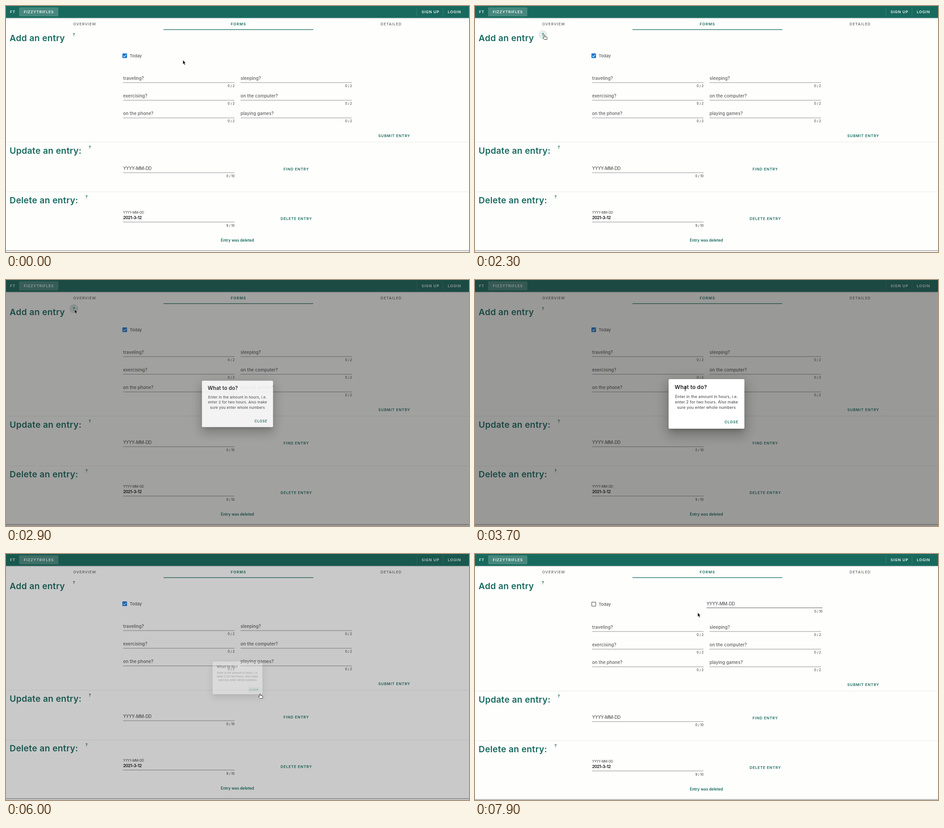
These frames come from a looping animation (1026 by 546 pixels, 8000 ms). An HTML page:

```html
<!DOCTYPE html>
<html lang="en">
<head>
<meta charset="utf-8">
<title>Entry forms</title>
<style>
  html, body { margin: 0; width: 100%; height: 100%; overflow: hidden; background: #fefefd; }
  svg { position: absolute; left: 0; top: 0; font-family: Inter, "Open Sans", sans-serif; font-weight: 600; }
  text { white-space: pre; }
  .head { font-size: 19.2px; letter-spacing: .3px; fill: #186a5e; }
  .label { font-size: 9.7px; font-weight: 500; letter-spacing: .1px; fill: #5e5e5e; }
  .today { font-size: 9.3px; font-weight: 500; fill: #5e5e5e; }
  .date { font-size: 9.7px; font-weight: 500; letter-spacing: -.4px; fill: #5e5e5e; }
  .mini { font-size: 7.2px; font-weight: 500; letter-spacing: -.35px; fill: #5e5e5e; }
  .value { font-size: 9.3px; letter-spacing: -.55px; fill: #111; }
  .count { font-size: 7px; font-weight: 500; text-anchor: end; fill: #4c4c4c; }
  .btn { font-size: 8.2px; letter-spacing: .78px; fill: #186a5e; }
  .bar { font-size: 8.2px; letter-spacing: .85px; fill: #f2f7f6; }
  .tab { font-size: 8.2px; font-weight: 500; letter-spacing: 1px; fill: #606060; }
  .tab.on { font-weight: 600; fill: #186a5e; }
  .help { font-size: 8.6px; font-weight: 700; text-anchor: middle; fill: #186a5e; }
  .note { font-size: 8.5px; fill: #186a5e; }
  .title { font-size: 12px; letter-spacing: .2px; fill: #1c1c1c; }
  .body { font-size: 8.6px; font-weight: 500; letter-spacing: .19px; text-anchor: middle; fill: #555; }
  .line { stroke: #8e8e8e; }
  .rule { stroke: #e9e9e9; }
  #dialog {
    left: 429px; top: 219.5px; background: #fff; border-radius: 2.5px;
    box-shadow: 0 7px 9px -4px #0003, 0 15px 23px 2px #00000024, 0 6px 28px 5px #0000001f;
  }
</style>
</head>
<body>
<svg id="page" width="1026" height="546"></svg>
<svg id="dialog" width="168" height="110" viewBox="429 219.5 168 110"></svg>
<svg id="top" width="1026" height="546">
  <path id="cursor" stroke-linejoin="round"/>
</svg>
<script>
const $ = id => document.getElementById(id);
const text = (x, y, str, cls) => `<text x="${x}" y="${y}" class="${cls}">${str}</text>`;
const line = (x1, x2, y, cls) => `<path d="M${x1} ${y}H${x2}" class="${cls}"/>`;
const field = (x, y, label, cls = 'label', max = 2) =>
  text(x, y + 4, label, cls) + line(x, x + 247, y + 10, 'line') + text(x + 247, y + 19.6, `0 / ${max}`, 'count');
const section = (y, title, helpX) => text(8, y + 6.6, title, 'head') + text(helpX, y - 4.5, '?', 'help');

const labels = ['traveling?', 'sleeping?', 'exercising?', 'on the computer?', 'on the phone?', 'playing games?'];

$('page').innerHTML = `
  <rect width="1026" height="28" fill="#000" opacity=".12"/>
  <rect width="1026" height="26.5" fill="#186a5e"/>
  <rect x="29" y="3" width="87" height="20" rx="2.5" fill="#fff" opacity=".2"/>
  <path d="M910.5 4V22M968.5 4V22" stroke="#fff" opacity=".13"/>
  ${text(9, 16, 'FT', 'bar')}${text(39.5, 16, 'FIZZYTRIFLES', 'bar')}
  ${text(921, 16, 'SIGN UP', 'bar')}${text(979, 16, 'LOGIN', 'bar')}
  ${text(149, 42.8, 'OVERVIEW', 'tab')}${text(498, 42.8, 'FORMS', 'tab on')}${text(830, 42.8, 'DETAILED', 'tab')}
  <rect x="349" y="51.8" width="332" height="1.3" fill="#186a5e"/>
  <circle id="halo" cx="150.5" cy="63.5" r="10" fill="#186a5e"/>
  ${section(71, 'Add an entry', 150.5)}
  <g id="checked">
    <rect x="258" y="105.3" width="10.2" height="10.2" rx="1.2" fill="#1976d2"/>
    <path d="M260 110.5L262.2 112.8 266.4 108.3" fill="none" stroke="#fff" stroke-width="1.2"/>
    ${text(274, 113.5, 'Today', 'today')}
  </g>
  <g id="unchecked">
    <rect x="258.6" y="106.8" width="9" height="9" rx=".8" fill="none" stroke="#626262" stroke-width="1.2"/>
    ${text(274, 114.5, 'Today', 'today')}
    ${text(513, 113.8, 'YYYY-MM-DD', 'date')}
    <path id="dateLine" d="M513 119.5H770"/>
    ${text(770, 129.6, '0 / 10', 'count')}
  </g>
  <g id="rest">
    ${labels.map((s, i) => field(259.5 + i % 2 * 260.2, 160 + (i >> 1) * 39.2, s)).join('')}
    ${text(825, 291.2, 'SUBMIT ENTRY', 'btn')}
    ${line(0, 1026, 302, 'rule')}
    ${section(321, 'Update an entry:', 185.7)}
    ${field(259.5, 360, 'YYYY-MM-DD', 'date', 10)}
    ${text(615, 365.3, 'FIND ENTRY', 'btn')}
    ${line(0, 1026, 412.5, 'rule')}
    ${section(431, 'Delete an entry:', 178.5)}
    ${text(259.5, 461, 'YYYY-MM-DD', 'mini')}${text(259.5, 473.3, '2021-3-12', 'value')}
    ${line(259.5, 506.5, 479.5, 'line')}${text(506.5, 489.6, '9 / 10', 'count')}
    ${text(608.5, 475, 'DELETE ENTRY', 'btn')}
    ${text(476, 523.2, 'Entry was deleted', 'note')}
    <path d="M0 542.5H1026" stroke="#a5a5a5"/>
    <path d="M0 543.5H1026" stroke="#d2d2d2"/>
    <path d="M0 544.5H1026" stroke="#ececec"/>
  </g>
  <rect id="shade" width="1026" height="546" fill="#212121"/>`;

$('dialog').innerHTML = `
  <rect id="closeHover" x="548" y="305" width="40.5" height="19.5" rx="2" fill="#e6f1ef"/>
  ${text(442.5, 241.7, 'What to do?', 'title')}
  ${['Enter in the amount in hours, i.e.', 'enter 2 for two hours. Also make', 'sure you enter whole numbers']
    .map((s, i) => text(513, 261.3 + i * 12.3, s, 'body')).join('')}
  ${text(553, 317.7, 'CLOSE', 'btn')}`;

// Each shape: path, fill, stroke, stroke width
const shapes = {
  arrow: ['M0 0V9.2L2 7.4 3.6 11 5.2 10.3 3.7 6.8H6.4Z', '#111', '#fff', .5],
  hand: ['M-1.2 6.5V1.4a1.1 1.1 0 0 1 2.2 0V4.2L5 4.9Q6.3 5.2 6 6.6L5.3 10.5H-.5L-3.7 7Q-3.4 5.6 -2.2 6Z', '#fff', '#222', .9],
  beam: ['M-2 -5Q0 -5 0 -3.5V3.5Q0 5 -2 5M2 -5Q0 -5 0 -3.5M0 3.5Q0 5 2 5M-1 1.5H1', 'none', '#333', .9]
};

// Pointer moves: first step, last step, goal x, goal y, shape
const moves = [
  [0, 0, 392, 120, 'arrow'], [600, 700, 255, 129, 'arrow'], [800, 800, 223, 127, 'arrow'],
  [1100, 1400, 90, 88, 'arrow'], [1500, 1500, 68, 70, 'beam'], [1600, 1900, 133, 70, 'beam'],
  [2000, 2100, 146, 66, 'arrow'], [2200, 2300, 154, 64, 'hand'], [2800, 2800, 152, 65, 'arrow'],
  [3100, 3300, 386, 206, 'arrow'], [3600, 3600, 430, 225, 'arrow'], [3700, 3700, 466, 241, 'beam'],
  [4100, 4800, 516, 268, 'beam'], [5000, 5200, 545, 290, 'arrow'], [5300, 5500, 563, 309, 'hand'],
  [5700, 5700, 563, 310, 'hand'], [6200, 6200, 563, 310, 'arrow'], [6300, 6500, 500, 158, 'arrow'],
  [6700, 6800, 300, 135, 'arrow'], [6900, 6900, 264, 119, 'hand'], [7000, 7000, 295, 117, 'hand'],
  [7200, 7200, 288, 113, 'hand'], [7900, 7900, 493.5, 130, 'arrow']
];

const STEP = 100, LOOP = 8000;
const clamp = v => Math.min(1, Math.max(0, v));
const set = (id, attrs) => Object.entries(attrs).forEach(([k, v]) => $(id).setAttribute(k, v));
const show = (id, on) => set(id, { opacity: +on });

function drawCursor(t) {
  let x = 0, y = 0, shape;
  for (const [from, to, goalX, goalY, kind] of moves) {
    if (t < from) break;
    const p = clamp((t - from + STEP) / (to - from + STEP));
    x += (goalX - x) * p;
    y += (goalY - y) * p;
    shape = kind;
  }
  const [d, fill, stroke, width] = shapes[shape];
  set('cursor', { d, fill, stroke, 'stroke-width': width, transform: `translate(${x} ${y})` });
}

function drawDialog(t) {
  const open = t >= 2800 && t < 6600;
  const closing = t >= 6000;
  const fade = closing ? 1 - clamp((t - 5878) / 250) : clamp((t - 2670) / 250);
  const rest = 1 - clamp((t - (closing ? 5872 : 2700)) / 400);
  const grow = closing ? rest ** 3 : 1 - rest ** 3;
  set('shade', { opacity: open ? .46 * fade : 0 });
  $('dialog').style.opacity = open ? grow : 0;
  $('dialog').style.transform = `scale(${.5 + grow / 2})`;
  show('closeHover', t >= 5300);
}

function draw(now) {
  const t = Math.floor(now / STEP) * STEP % LOOP;
  const checked = t < 7400;
  show('checked', checked);
  show('unchecked', !checked);
  set('dateLine', { stroke: t < 7900 ? '#8e8e8e' : '#5a5a5a' });
  set('rest', { transform: `translate(0 ${checked ? 0 : 2})` });
  set('halo', { opacity: t < 2100 || t >= 3000 ? 0 : t < 2800 ? .1 : t < 2900 ? .32 : .16 });
  drawDialog(t);
  drawCursor(t);
  requestAnimationFrame(draw);
}
draw(performance.now());
</script>
</body>
</html>
```
